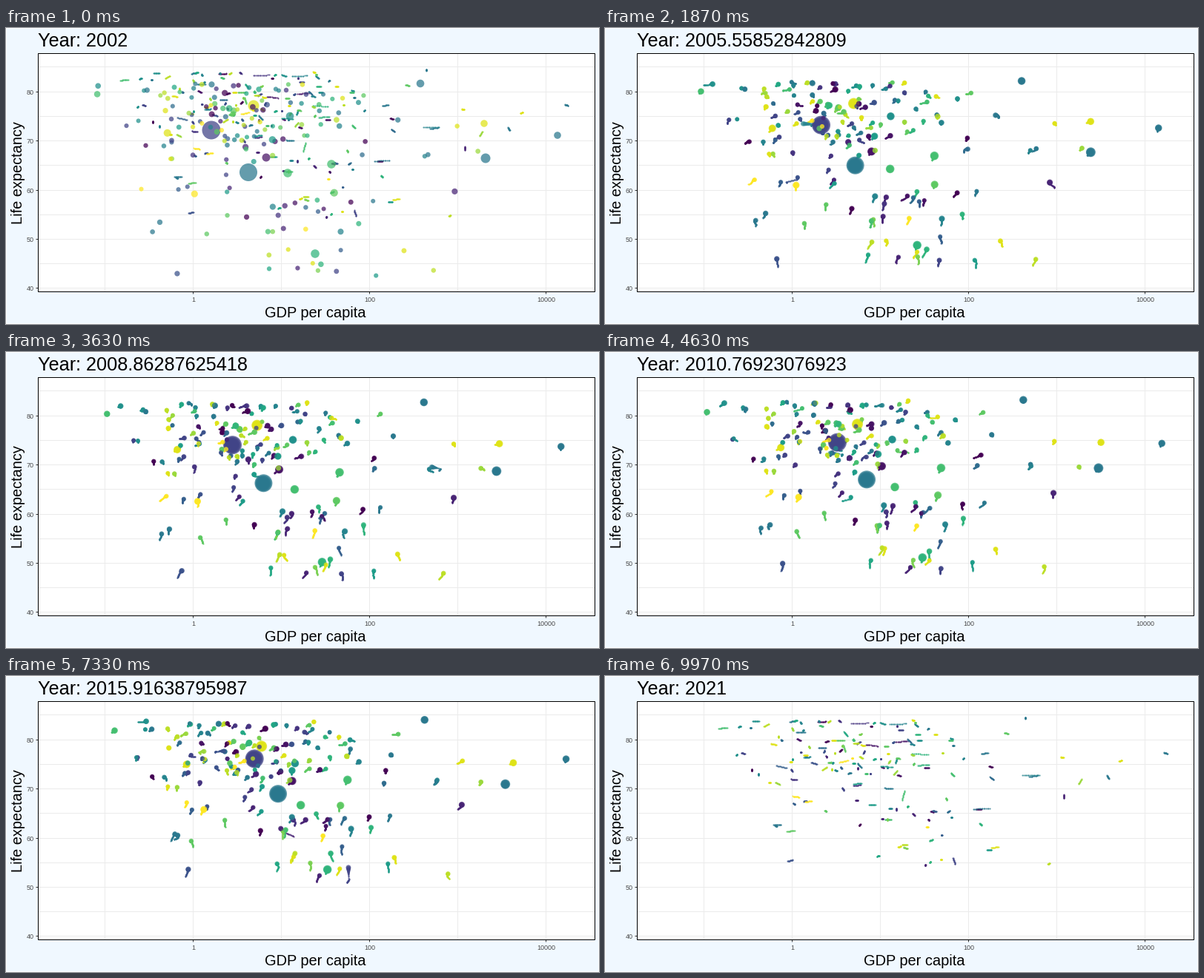
These frames come from a looping animation (800 px wide and 400 px high, 10 s). A matplotlib script:

```python
import matplotlib.pyplot as plt
import numpy as np
from matplotlib.animation import FuncAnimation
from matplotlib.patches import Rectangle

W, H, DPI = 800, 400, 100
PX = 72 / DPI                      # points per pixel
FRAMES, WAKE, NEAR = 300, 30, 9
FIRST, MIDDLE, LAST = 2002, 2012.7, 2021
DATA_END = 2020                    # bubbles stop here, the counter runs on
FONT = "Liberation Sans"
LEFT, TOP, RIGHT, BOTTOM = 43, 34, 794, 356

# Largest bubbles: x, y at the start, x, y in KEY_YEAR, radius, colour level
KEY_YEAR = 2018
KEY_BUBBLES = [
    (277, 138, 344, 107, 12.5, .2), (327, 195, 373, 154, 12, .4),
    (334, 105, 344, 94, 7.5, .95), (383, 119, 391, 118, 5.3, .5),
    (647, 176, 680, 141, 6.5, .4), (559, 75, 567, 57, 5.3, .4),
    (744, 145, 758, 108, 4.8, .4), (645, 129, 690, 116, 4.8, .95),
    (417, 305, 437, 255, 5.8, .65), (380, 196, 399, 171, 5.8, .7),
    (439, 184, 465, 134, 5.8, .7), (351, 175, 391, 136, 5.5, .05),
]

# Crowd in the middle year: count, mean x, spread of x, y range
CROWD = [
    (82, 318, 60, 66, 145),        # long lives, dense
    (36, 390, 175, 75, 185),       # thinly spread
    (42, 400, 110, 183, 285),      # short lives
]


def place_crowd(rng):
    """Middle-year positions and yearly speeds of the small bubbles."""
    spots = []
    for count, mean, spread, low, high in CROWD:
        x = rng.normal(mean, spread, count)
        x = np.where((x > 95) & (x < 650), x, rng.uniform(110, 640, count))
        y = low + (high - low) * rng.random(count) ** 1.3
        spots.append(np.column_stack([x, y]))
    spots = np.vstack(spots)
    n = len(spots)
    # the shorter the lives, the faster they lengthen
    rise = 1 + 3 * ((spots[:, 1] - 65) / 150) ** 2
    rise = np.minimum(rise, 5) * rng.uniform(.75, 1.2, n)
    return spots, np.column_stack([rng.normal(1.2, 1.1, n), -rise])


def build_tracks(seed):
    """Yearly positions (country, year, xy), radii and colour levels."""
    rng = np.random.default_rng(seed)
    key = np.array(KEY_BUBBLES, float)
    spots, speed = place_crowd(rng)
    n = len(spots)

    start = np.vstack([key[:, :2], spots - speed * (MIDDLE - FIRST)])
    rate = np.vstack([(key[:, 2:4] - key[:, :2]) / (KEY_YEAR - FIRST), speed])
    years = np.arange(DATA_END - FIRST + 1)
    pos = start[:, None] + rate[:, None] * years[None, :, None]

    # uneven years: a random walk tied down at both ends
    walk = np.cumsum(rng.standard_t(3, pos.shape) * (1.2, .5), axis=1)
    walk -= walk[:, :1]
    walk -= walk[:, -1:] * (years / years[-1])[None, :, None]
    walk[:len(key)] *= .3
    pos += walk

    # the last year brings sudden shifts
    shift = rng.standard_t(3, (len(pos), 2)) * (4.5, 1.8)
    pos[:, -1] = pos[:, -2] + shift.clip(-25, 25)
    pos[:, :, 1] = pos[:, :, 1].clip(50, 345)

    radius = np.r_[key[:, 4], 3 + rng.exponential(.4, n)]
    level = np.r_[key[:, 5], rng.integers(0, 21, n) / 20]
    return pos, radius, level


def year_at(i):
    return FIRST + (LAST - FIRST) * i / (FRAMES - 1)


def place_frames(pos):
    """Positions of every country in every frame that has data."""
    t = np.array([year_at(i) for i in range(FRAMES)])
    t = t[t < DATA_END] - FIRST
    k = t.astype(int)
    f = (t - k)[:, None, None]
    by_year = pos.transpose(1, 0, 2)
    return by_year[k] * (1 - f) + by_year[k + 1] * f


yearly, radii, levels = build_tracks(8)
places = place_frames(yearly)
colours = plt.cm.viridis(levels)
colours[:, 3] = .73

fig = plt.figure(figsize=(W / DPI, H / DPI), dpi=DPI, facecolor="#F0F8FF")
ax = fig.add_axes([0, 0, 1, 1])
ax.set_xlim(0, W)
ax.set_ylim(H, 0)
ax.axis("off")


def line(x0, y0, x1, y1, colour):
    ax.plot([x0, x1], [y0, y1], color=colour, lw=PX, zorder=1,
            solid_capstyle="butt")


def label(x, y, text, size, colour="black", **kw):
    return ax.text(x, y, text, fontsize=size * PX, family=FONT,
                   color=colour, va="baseline", **kw)


def frame(x, y, w, h, **kw):
    ax.add_patch(Rectangle((x, y), w, h, lw=PX, **kw))


def draw_chart():
    frame(0, 0, W - 1, H - 1, fc="none", ec="white", zorder=0)
    frame(LEFT, TOP, RIGHT - LEFT, BOTTOM - TOP, fc="white", ec="none",
          zorder=0)
    for power in range(-1, 5):
        x = 252 + 119 * power
        line(x, TOP, x, BOTTOM, "#EBEBEB")
        if power % 2 == 0:
            line(x, BOTTOM, x, BOTTOM + 3, "#333333")
            label(x + .5, 370, str(10 ** power), 9, "#4D4D4D", ha="center")
    for life in range(40, 86, 5):
        y = round(351.3 - (life - 40) * 6.64)
        line(LEFT, y, RIGHT, y, "#EBEBEB")
        if life % 10 == 0:
            line(LEFT - 3, y, LEFT, y, "#333333")
            label(38, y + 4, str(life), 9, "#4D4D4D", ha="right")
    frame(LEFT, TOP, RIGHT - LEFT, BOTTOM - TOP, fc="none", ec="black",
          zorder=6)
    label(417.5, 391, "GDP per capita", 20, ha="center")
    label(22, 196, "Life expectancy", 20, ha="center", rotation=90,
          rotation_mode="anchor")


draw_chart()
title = label(43, 25, "", 25.3)
groups = [(np.flatnonzero(levels == c), ax.plot(
    [], [], "o", ms=2.1 * PX, mew=0, color=plt.cm.viridis(c), alpha=.8,
    zorder=3)[0]) for c in np.unique(levels)]
bubbles = ax.scatter([], [], linewidths=0, zorder=4)


def step(i):
    title.set_text(f"Year: {year_at(i):.15g}")

    # old part of the wake: fine dots, carried over the loop's seam
    old = [(i - age) % FRAMES for age in range(WAKE, NEAR, -1)]
    old = places[[j for j in old if j < len(places)]]
    for members, dots in groups:
        xy = old[:, members].reshape(-1, 2)
        dots.set_data(xy[:, 0], xy[:, 1])

    # fresh part of the wake: shrinking bubbles, newest on top
    ages = [a for a in range(NEAR, -1, -1) if 0 <= i - a < len(places)]
    bubbles.set_visible(bool(ages))
    if ages:
        shrink = (1 - np.array(ages) / (WAKE + 1)) ** 3
        r = np.maximum(shrink[:, None] * radii, 1)
        bubbles.set_offsets(places[[i - a for a in ages]].reshape(-1, 2))
        bubbles.set_sizes((2 * r.ravel() * PX) ** 2, DPI)
        bubbles.set_facecolors(np.tile(colours, (len(ages), 1)))
    return [title, bubbles] + [dots for _, dots in groups]


anim = FuncAnimation(fig, step, frames=FRAMES, interval=10000 / FRAMES,
                     repeat=True, repeat_delay=0, blit=False)
plt.show()
```
